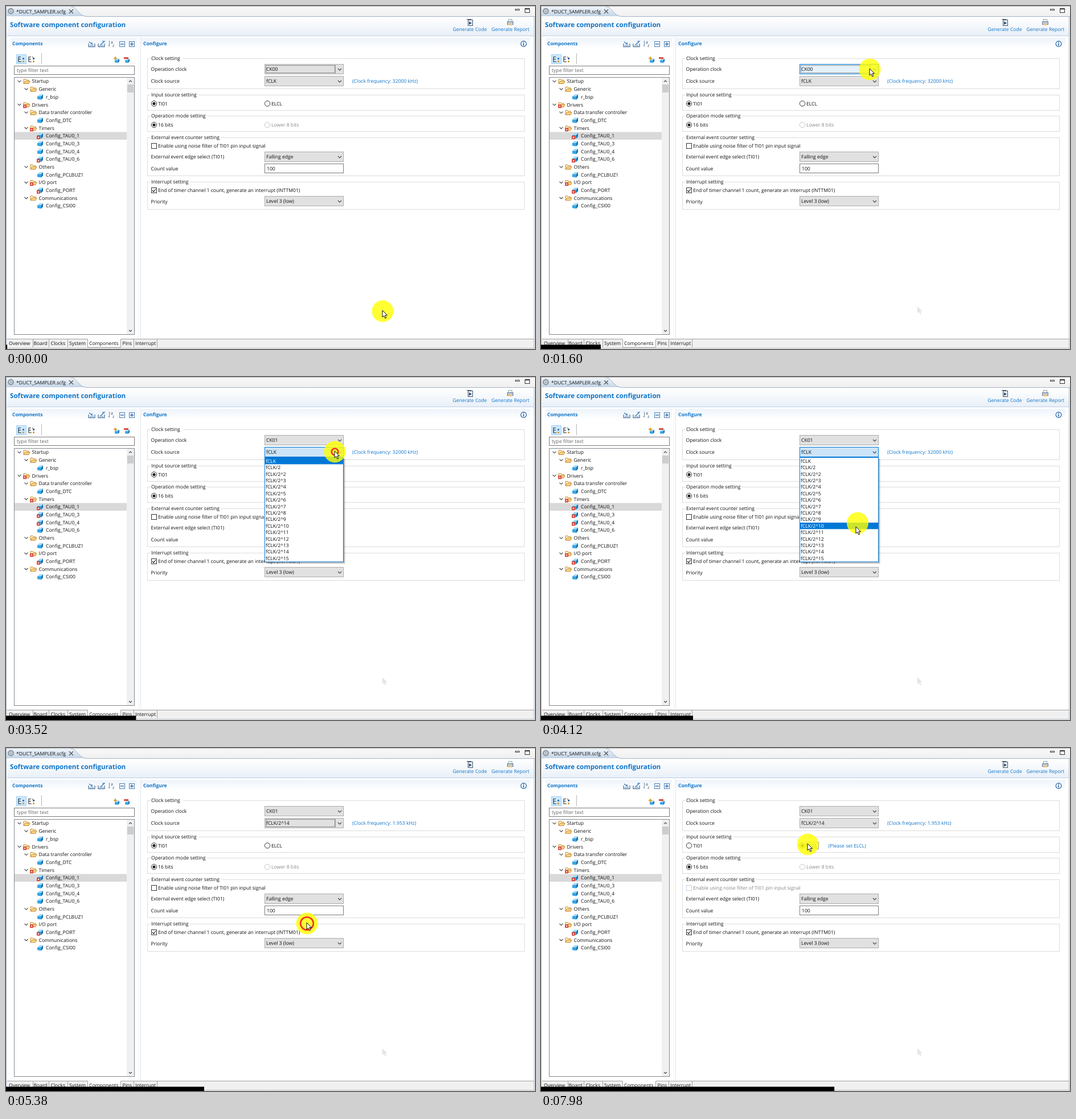
Recreate the animation shown at these times as an HTML page with a canvas. Size 929 by 603 pixels, loop 8000 ms.

```html
<!DOCTYPE html>
<html lang="en">
<head>
<meta charset="utf-8">
<title>Component configuration</title>
<style>
html, body { margin: 0; width: 100%; height: 100%; overflow: hidden; background: #fff; }
canvas { display: block; }
</style>
</head>
<body>
<canvas id="stage" width="929" height="603"></canvas>
<script>
const g = document.getElementById('stage').getContext('2d');
const LOOP = 8000, BLUE = '#0f74c8', ACCENT = '#0078d7', INK = '#111';
const OP_OPEN = 1750, OP_PICK = 2545, SRC_OPEN = 3420, SRC_PICK = 5130, ELCL_PICK = 6780;
const CLICKS = [OP_OPEN, OP_PICK, SRC_OPEN, SRC_PICK, ELCL_PICK];
const OP_ITEMS = ['CK00', 'CK01', 'CK02', 'CK03'];
const SRC_ITEMS = ['fCLK', 'fCLK/2', ...Array.from({ length: 14 }, (_, i) => 'fCLK/2^' + (i + 2))];

// Pointer path: time, x, y
const PATH = [
  [0, 661, 535], [300, 661, 535], [590, 673, 440], [775, 670, 315], [810, 666, 292],
  [1000, 640, 150], [1200, 608, 102], [1450, 577, 110], [2000, 577, 110], [2250, 571, 134],
  [2950, 571, 134], [3250, 577, 130], [3600, 577, 130], [4085, 555.5, 255], [4120, 553, 263],
  [4700, 528, 307], [5850, 528, 307], [6050, 563, 262], [6250, 530, 195], [6480, 467, 168],
  [7000, 467, 168], [7600, 468, 168], [8001, 468, 168]
];

// Tree rows: level, label, kind of error mark
const TREE = [
  [0, 'Startup'], [1, 'Generic'], [2, 'r_bsp'], [0, 'Drivers', 1], [1, 'Data transfer controller'],
  [2, 'Config_DTC'], [1, 'Timers', 1], [2, 'Config_TAU0_1', 1], [2, 'Config_TAU0_3', 'shared'],
  [2, 'Config_TAU0_4', 'shared'], [2, 'Config_TAU0_6', 'initial'], [1, 'Others'],
  [2, 'Config_PCLBUZ1'], [1, 'I/O port', 1], [2, 'Config_PORT', 1], [1, 'Communications'],
  [2, 'Config_CSI00']
];

function tangent(i, axis) {
  const a = PATH[i - 1], b = PATH[i], c = PATH[i + 1];
  if (!a || !c) return 0;
  const still = (p, q) => p[1] === q[1] && p[2] === q[2];
  return still(a, b) || still(b, c) ? 0 : (c[axis] - a[axis]) / (c[0] - a[0]);
}

function pointer(t) {
  t = Math.max(0, t);
  const i = PATH.findIndex(p => p[0] > t) - 1, a = PATH[i], b = PATH[i + 1];
  const d = b[0] - a[0], u = (t - a[0]) / d, u2 = u * u, u3 = u2 * u;
  return [1, 2].map(k =>
    (2 * u3 - 3 * u2 + 1) * a[k] + (3 * u2 - 2 * u3) * b[k] +
    d * ((u3 - 2 * u2 + u) * tangent(i, k) + (u3 - u2) * tangent(i + 1, k)));
}

function fill(x, y, w, h, color) {
  g.fillStyle = color;
  g.fillRect(x, y, w, h);
}

function box(x, y, w, h, border, inside) {
  if (inside) fill(x, y, w, h, inside);
  g.strokeStyle = border;
  g.lineWidth = 1;
  g.strokeRect(x + .5, y + .5, w - 1, h - 1);
}

function text(s, x, y, color = INK, size = 8.6, weight = 400) {
  g.font = `${weight} ${size}px "Open Sans", "Noto Sans", sans-serif`;
  g.fillStyle = color;
  g.fillText(s, x, y + size * .37);
}

function line(points, color, width = 1) {
  g.beginPath();
  points.forEach(p => g.lineTo(...p));
  g.strokeStyle = color;
  g.lineWidth = width;
  g.stroke();
}

function shape(points, color, border) {
  g.beginPath();
  points.forEach(p => g.lineTo(...p));
  g.closePath();
  g.fillStyle = color;
  g.fill();
  if (border) { g.strokeStyle = border; g.lineWidth = 1; g.stroke(); }
}

function disc(x, y, r, color, border, width = 1) {
  g.beginPath();
  g.arc(x, y, r, 0, 7);
  if (color) { g.fillStyle = color; g.fill(); }
  if (border) { g.strokeStyle = border; g.lineWidth = width; g.stroke(); }
}

function gradient(x, y, w, h, top, bottom) {
  const c = g.createLinearGradient(0, y, 0, y + h);
  c.addColorStop(0, top);
  c.addColorStop(1, bottom);
  fill(x, y, w, h, c);
}

const chevron = (x, y, r = 3, color = '#444') =>
  line([[x - r, y - r / 2], [x, y + r / 2], [x + r, y - r / 2]], color, 1.1);

function errorMark(x, y) {
  fill(x, y, 6, 6, '#d83a32');
  line([[x + 1.5, y + 1.5], [x + 4.5, y + 4.5]], '#fff');
  line([[x + 4.5, y + 1.5], [x + 1.5, y + 4.5]], '#fff');
}

function folder(x, y) {
  shape([[x - 5, y + 4], [x - 5, y - 3.5], [x - 1, y - 3.5], [x, y - 2], [x + 4, y - 2], [x + 4, y + 4]], '#fff3cf', '#c8892c');
  shape([[x - 5, y + 4], [x - 2.5, y], [x + 6, y], [x + 4, y + 4]], '#fbd98b', '#c8892c');
}

function cube(x, y, s = 1) {
  const at = points => points.map(([a, b]) => [x + a * s, y + b * s]);
  shape(at([[-5, -1], [-1, -4.5], [5, -4.5], [2, -1]]), '#a5dcf8');
  shape(at([[-5, -1], [2, -1], [2, 5], [-5, 4]]), '#35a5e4');
  shape(at([[2, -1], [5, -4.5], [5, 1.5], [2, 5]]), '#1670b4');
}

function arrow(x, y, color, border) {
  const points = [[0, 0], [0, 12], [2.8, 9.4], [4.8, 14], [6.8, 13.2], [4.8, 8.7], [8.5, 8.7]];
  shape(points.map(p => [x + p[0], y + p[1]]), color, border);
}

function drawFrame() {
  fill(0, 0, 929, 603, '#fff');
  gradient(0, 0, 929, 18, '#f8f8f8', '#f0f0f0');
  g.save();
  g.beginPath();
  g.moveTo(0, 0);
  g.lineTo(112, 0);
  g.bezierCurveTo(126, 1, 126, 18, 142, 18);
  g.lineTo(0, 18);
  g.clip();
  gradient(0, 0, 142, 18, '#f4f8fc', '#c3d4e7');
  g.restore();
  g.beginPath();
  g.moveTo(112, .5);
  g.bezierCurveTo(126, 1, 126, 18, 142, 18.5);
  g.lineTo(929, 18.5);
  g.strokeStyle = '#9fb2c8';
  g.lineWidth = 1;
  g.stroke();
  line([[0, .5], [929, .5]], '#b5b5b5');
  disc(8.5, 9, 4, null, '#8b949c', 2);
  disc(8.5, 9, 5.3, null, '#a6adb4');
  disc(8.5, 9, 1.4, '#8b949c');
  text('*DUCT_SAMPLER.scfg', 18, 9.5);
  line([[111, 6], [118, 13]], '#555', 1.2);
  line([[118, 6], [111, 13]], '#555', 1.2);
  box(894, 5, 8, 3, '#444', '#fff');
  box(911, 4, 9, 8, '#333', '#fff');
  fill(911, 4, 9, 2, '#333');

  gradient(2, 20, 925, 32, '#ffffff', '#e9f0f8');
  line([[2, 52.5], [927, 52.5]], '#b9d0e8');
  text('Software component configuration', 7, 33, BLUE, 11.65, 700);
  text('Generate Code', 784.5, 41, BLUE);
  text('Generate Report', 852.5, 41, BLUE);
  box(811, 24, 9, 11, '#456', '#eef4fa');
  line([[809, 23.5], [817, 23.5]], '#456');
  shape([[813, 27], [818, 30], [813, 33]], '#2b4d77');
  box(882, 23, 7, 5, '#8aa', '#fff');
  box(880, 27, 11, 6, '#6d7f9c', '#b9c8e2');
  fill(882, 30, 7, 4, '#e5c690');

  gradient(8, 56, 222, 19, '#eef4fb', '#ffffff');
  gradient(237, 56, 684, 19, '#eef4fb', '#ffffff');
  line([[236.5, 54], [236.5, 584]], '#dfe6ee');
  line([[233.5, 54], [233.5, 584]], '#f0f0f0');
  text('Components', 11, 66, BLUE, 8.45, 700);
  text('Configure', 241, 66, BLUE, 8.6, 700);
  disc(909, 66.5, 4.8, '#fff', '#1f5fa5', 1.2);
  fill(908.3, 65.5, 1.6, 4, '#1f5fa5');
  fill(908.3, 63, 1.6, 1.5, '#1f5fa5');

  for (const x of [145, 162]) {
    line([[x, 66], [x, 71.5], [x + 11, 71.5], [x + 11, 66]], '#54789e', 1.3);
    fill(x + 2, 68, 7, 2, '#a9c3dc');
  }
  line([[146, 63], [151, 67], [151, 64]], '#2a72b5', 1.2);
  line([[166, 68], [173, 62], [169, 62]], '#2a72b5', 1.2);
  line([[181.5, 61], [181.5, 71], [179.5, 69]], '#6d86a0');
  text('a', 184, 63, '#345', 7);
  text('z', 187, 69, '#345', 7);
  for (const x of [199, 216]) {
    box(x, 62, 10, 10, '#5483b3', '#eef5fc');
    line([[x + 2, 67], [x + 8, 67]], '#235d9b', 1.2);
  }
  line([[221, 64], [221, 70]], '#235d9b', 1.2);

  // View toolbar
  box(18, 85, 18, 17, '#99d1ff', '#cce8ff');
  for (const x of [22, 40]) {
    line([[x, 89], [x, 98], [x + 5, 98]], '#333', 1.2);
    line([[x, 89.5], [x + 4, 89.5]], '#333');
    line([[x, 93.5], [x + 4, 93.5]], '#333');
    fill(x + 7, 91, 3, 3, '#3a7fbb');
    fill(x + 7, 96, 3, 3, '#d5a437');
  }
  line([[46, 89], [50, 93]], '#333');
  line([[62.5, 83], [62.5, 102]], '#b5b5b5');
  cube(195, 96, .8);
  line([[189, 92], [195, 92]], '#d99b22', 1.8);
  line([[192, 89], [192, 95]], '#d99b22', 1.8);
  cube(213, 96, .8);
  fill(207, 90, 8, 3, '#d84b3c');
  box(14, 105, 212, 16, '#7a7a7a', '#fff');
  text('type filter text', 19, 113, '#666');
}

function drawTree(t) {
  box(14, 125, 212, 453, '#828790', '#fff');
  fill(212, 126, 13, 451, '#f0f0f0');
  fill(213, 138, 11, 14, '#cdcdcd');
  line([[216, 133.5], [218.5, 131], [221, 133.5]], '#555', 1.2);
  chevron(218.5, 571, 2.5);
  fill(15, 221.5, 197, 13.5, '#d9d9d9');
  const active = { 1: true, shared: t >= OP_PICK && t < SRC_PICK, initial: t < OP_PICK };
  TREE.forEach(([level, label, error], i) => {
    const y = 132.3 + i * 13.68, x = 36 + level * 12;
    if (level < 2) {
      chevron(x - 12.5, y);
      folder(x, y);
    } else cube(x, y);
    if (active[error]) errorMark(x - 6, y);
    text(label, x + (level < 2 ? 9.5 : 10), y);
  });
}

function drawTabs() {
  fill(0, 585, 929, 18, '#f0f0f0');
  fill(143, 585, 58, 15, '#fff');
  line([[2, 585.5], [143.5, 585.5], [143.5, 600], [201.5, 600], [201.5, 585.5], [927, 585.5]], '#a0a0a0');
  const names = ['Overview', 'Board', 'Clocks', 'System', 'Components', 'Pins', 'Interrupt'];
  const starts = [5, 48.5, 78.5, 111, 146, 204.5, 227];
  names.forEach((name, i) => text(name, starts[i], 593));
  for (const x of [47, 75, 108, 224, 265]) line([[x + .5, 586], [x + .5, 600]], '#a0a0a0');
  line([[.5, 0], [.5, 603]], '#a9b6c5');
  line([[927.5, 18], [927.5, 601]], '#a9b6c5');
  line([[0, 601.5], [929, 601.5]], '#b7bec6');
}

function group(label, y, h, legendWidth) {
  box(248, y, 663, h, '#dcdcdc');
  fill(253, y - 1, legendWidth, 3, '#fff');
  text(label, 255, y);
}

function dotted(x, y, w, h, color = '#333') {
  g.setLineDash([1, 1]);
  box(x, y, w, h, color);
  g.setLineDash([]);
}

function combo(value, y, [px, py], { open, focus, blocked } = {}) {
  const hot = !blocked && px >= 454 && px < 593 && py >= y && py < y + 18;
  box(454, y, 139, 18, open || hot ? ACCENT : '#adadad', open ? '#cce4f7' : hot ? '#e5f1fb' : '#e1e1e1');
  if (focus && !open) dotted(456, y + 2, 122, 14);
  if (focus && !open) line([[578.5, y + 1], [578.5, y + 17]], '#adadad');
  text(value, 457, y + 9);
  chevron(586, y + 9.5);
}

function radio(label, x, y, on, off) {
  disc(x, y, 4.7, '#fff', off ? '#c4c4c4' : '#333');
  if (on) disc(x, y, 2.6, '#222');
  text(label, x + 7, y, off ? '#888' : INK);
}

function checkbox(label, y, on, off) {
  box(255, y - 5, 10, 10, off ? '#bcd4ea' : '#333', '#fff');
  if (on) line([[257, y], [259.3, y + 2.5], [263, y - 2.5]], '#222', 1.2);
  text(label, 267, y, off ? '#888' : INK);
}

function dropdown(items, top, [, py]) {
  const pitch = 11.4, h = items.length * pitch + 2;
  const chosen = Math.max(0, Math.min(items.length - 1, Math.floor((py - top - .5) / pitch)));
  fill(457, top + 3, 139, h, 'rgba(0,0,0,.12)');
  fill(456, top + 2, 138.5, h, 'rgba(0,0,0,.2)');
  box(454, top, 139, h, ACCENT, '#fff');
  items.forEach((item, i) => {
    const y = top + 1 + i * pitch;
    if (i === chosen) fill(455, y, 137, pitch, ACCENT);
    text(item, 456, y + pitch / 2, i === chosen ? '#fff' : INK);
  });
}

function drawForm(t, tip) {
  const opOpen = t >= OP_OPEN && t < OP_PICK, srcOpen = t >= SRC_OPEN && t < SRC_PICK;
  const slow = t >= SRC_PICK, elcl = t >= ELCL_PICK, blocked = opOpen || srcOpen;
  group('Clock setting', 92, 54, 58);
  text('Operation clock', 254.5, 111);
  combo(OP_ITEMS[+(t >= OP_PICK)], 102, tip, { open: opOpen, focus: t < SRC_OPEN, blocked });
  text('Clock source', 254.5, 132);
  combo(SRC_ITEMS[slow ? 14 : 0], 123, tip, { open: srcOpen, focus: slow && !elcl, blocked });
  text(`(Clock frequency: ${slow ? '1.953' : '32000'} kHz)`, 608, 132, BLUE);

  group('Input source setting', 156, 28, 85);
  radio('TI01', 260, 171.5, !elcl);
  radio('ELCL', 459, 171.5, elcl);
  if (elcl) {
    dotted(465, 165, 23, 13);
    text('(Please set ELCL)', 504.5, 171.5, BLUE);
  }
  group('Operation mode setting', 193, 28, 100);
  radio('16 bits', 260, 209, true);
  radio('Lower 8 bits', 459, 209, false, true);

  group('External event counter setting', 231, 68, 124);
  checkbox('Enable using noise filter of TI01 pin input signal', 246, false, elcl);
  text('External event edge select (TI01)', 254.5, 265);
  combo('Falling edge', 256, tip, { blocked });
  text('Count value', 254.5, 286);
  box(454, 277, 139, 17, '#7a7a7a', '#fff');
  text('100', 458, 285.5);

  group('Interrupt setting', 309, 49, 70);
  checkbox('End of timer channel 1 count, generate an interrupt (INTTM01)', 324, true);
  text('Priority', 254.5, 343.5);
  combo('Level 3 (low)', 334, tip, { blocked });

  if (opOpen) dropdown(OP_ITEMS, 120, tip);
  if (srcOpen) dropdown(SRC_ITEMS, 141, tip);
}

function drawPointer(t, [x, y]) {
  // The highlight trails slightly behind the arrow.
  const [hx, hy] = pointer(t - 35);
  if (t > 420) arrow(661, 528, '#e4e4e4');
  disc(hx + .5, hy + 1.5, 19, 'rgba(255,255,0,.8)');
  for (const start of CLICKS) {
    const age = t - start;
    if (age < 0 || age > 450) continue;
    g.globalAlpha = Math.min(1, (450 - age) / 150);
    disc(hx + .5, hy + 1.5, 2 + age * .037, null, '#f5301c', 2.6);
    g.globalAlpha = 1;
  }
  arrow(x, y, '#fff', '#111');
}

function render(now) {
  const t = now % LOOP, tip = pointer(t);
  g.textRendering = 'geometricPrecision';
  drawFrame();
  drawTree(t);
  drawTabs();
  drawForm(t, tip);
  drawPointer(t, tip);
  fill(0, 595.5, 2 + t * .0643, 7.5, '#000');
}

const began = performance.now();
function tick() {
  render(performance.now() - began);
  requestAnimationFrame(tick);
}
tick();
</script>
</body>
</html>
```
